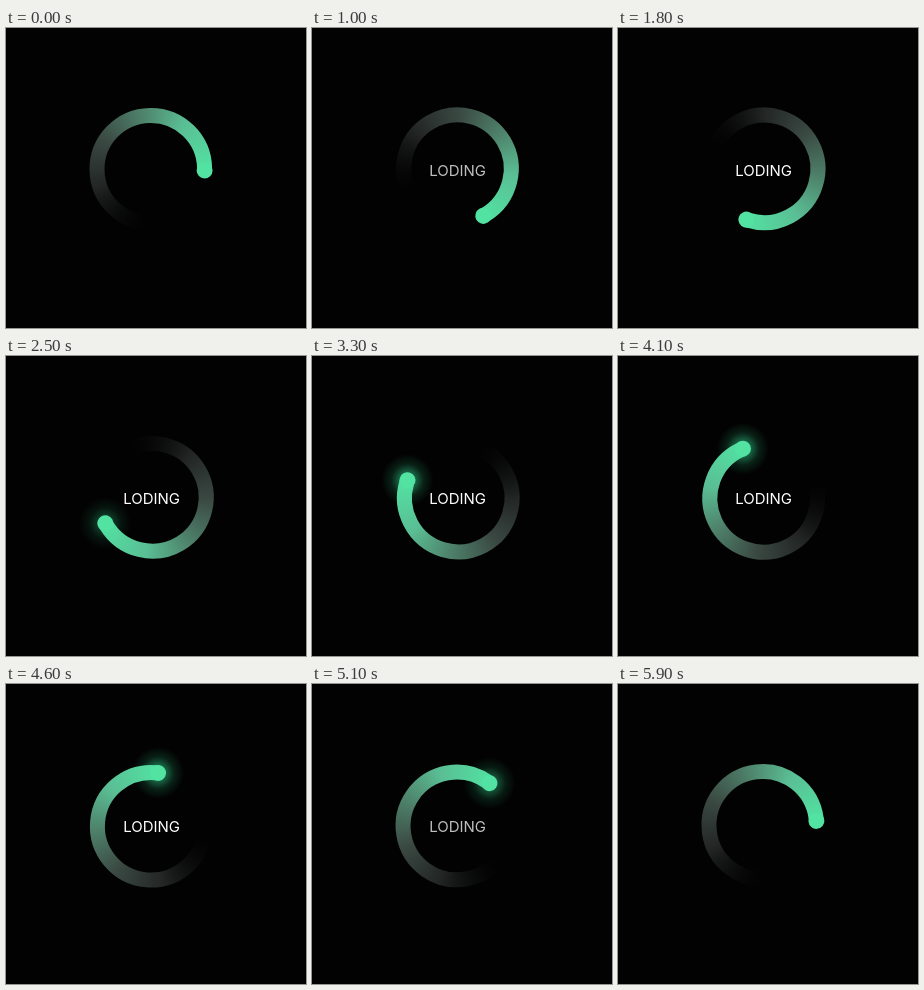
An HTML page with a canvas for the animation above (6000 ms loop, 300 px wide and 300 px high).

```html
<!DOCTYPE html>
<html lang="en">
<head>
<meta charset="utf-8">
<title>Loading ring</title>
<style>
  html, body { margin: 0; width: 100%; height: 100%; overflow: hidden; background: #020202; }
  canvas { display: block; }
</style>
</head>
<body>
<canvas id="stage" width="300" height="300"></canvas>
<script>
const ctx = document.getElementById('stage').getContext('2d');
const LOOP = 6000, STEP = 100, TAU = Math.PI * 2;
const CENTER = { x: 145.6, y: 141.5 };
const HEAD_RADIUS = 53;
const rad = deg => deg * Math.PI / 180;
const ramp = (t, from, to) => Math.min(1, Math.max(0, (t - from) / (to - from)));
const pulse = (t, a, b, c, d) => ramp(t, a, b) * (1 - ramp(t, c, d));

// The ring sits slightly off the pivot, so it wobbles as it turns.
const ringX = 0.85 * Math.cos(rad(200)), ringY = 0.85 * Math.sin(rad(200));

// Tail colours by degrees behind the head.
const tail = ctx.createConicGradient(0, ringX, ringY);
[[0, '82,226,162,1'], [55, '90,190,148,1'], [100, '78,130,107,1'], [150, '58,72,66,1'],
 [200, '34,37,36,1'], [270, '2,2,2,0'], [360, '2,2,2,0']]
  .forEach(([behind, rgba]) => tail.addColorStop(1 - behind / 360, `rgba(${rgba})`));

const glow = ctx.createRadialGradient(HEAD_RADIUS, 0, 4, HEAD_RADIUS, 0, 26);
[[0, 0.6], [0.25, 0.4], [0.55, 0.15], [1, 0]]
  .forEach(([at, alpha]) => glow.addColorStop(at, `rgba(50,215,145,${alpha})`));

function disc(x, y, r, fill) {
  ctx.fillStyle = fill;
  ctx.beginPath();
  ctx.arc(x, y, r, 0, TAU);
  ctx.fill();
}

function draw(t) {
  ctx.globalAlpha = 1;
  ctx.fillStyle = '#020202';
  ctx.fillRect(0, 0, 300, 300);

  ctx.save();
  ctx.translate(CENTER.x, CENTER.y);
  ctx.rotate(rad(1 + t * 360 / LOOP));
  ctx.globalAlpha = pulse(t, 2000, 2900, 5000, 5500);
  disc(HEAD_RADIUS, 0, 26, glow);
  ctx.globalAlpha = 1;
  ctx.strokeStyle = tail;
  ctx.lineWidth = 15;
  ctx.beginPath();
  ctx.arc(ringX, ringY, 53.8, rad(-272), 0);
  ctx.stroke();
  disc(HEAD_RADIUS, 0, 8, '#52e2a2');
  ctx.restore();

  ctx.globalAlpha = pulse(t, 400, 1200, 4900, 5700);
  ctx.fillStyle = '#fff';
  ctx.font = '400 15px Inter, sans-serif';
  ctx.textAlign = 'center';
  ctx.fillText('LODING', CENTER.x, 148);
}

function frame() {
  const t = performance.now() % LOOP;
  draw(Math.floor(t / STEP) * STEP);
  requestAnimationFrame(frame);
}
frame();
</script>
</body>
</html>
```
